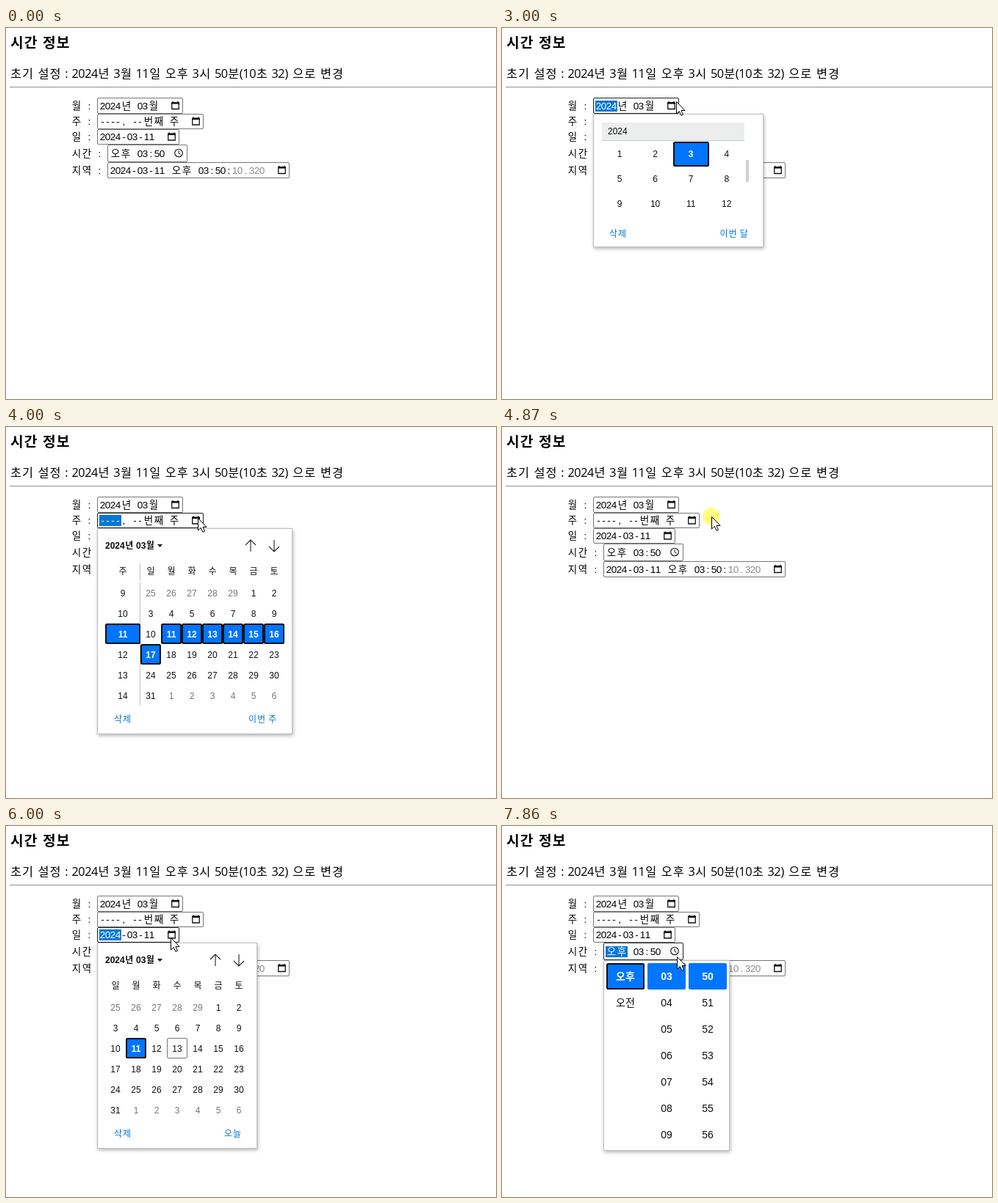
Animation, 667 px wide and 506 px high, one loop 8 s. Source, as an HTML page:

```html
<!DOCTYPE html>
<html lang="ko">
<head>
<meta charset="utf-8">
<style>
  html, body { margin: 0; width: 100%; height: 100%; overflow: hidden; background: #fff; }
  svg { display: block; width: 667px; height: 506px; }
  text { white-space: pre; text-anchor: middle; }
  .sans { font-family: "Open Sans", "Noto Sans CJK KR", "Noto Sans CJK", sans-serif; }
  .mono { font-family: "Liberation Sans", "Noto Sans CJK KR", "Noto Sans CJK", sans-serif; font-size: 13.5px; }
  .ui { font-family: "Liberation Sans", "Noto Sans CJK KR", "Noto Sans CJK", sans-serif; }
  .popup { filter: drop-shadow(1px 2px 2.5px rgba(0, 0, 0, .3)); }
</style>
</head>
<body>
<svg id="stage" viewBox="0 0 667 506" xmlns="http://www.w3.org/2000/svg"></svg>
<script>
const LOOP = 8000;
const BLUE = '#0075ff', LINK = '#0078d4', GREY = '#767676', PICK = '#0078d7';
const stage = document.getElementById('stage');

const isHangul = c => c >= '가' && c <= '힣';
const monoStep = c => isHangul(c) ? 14 : 7;
const bodyStep = em => c => em * (isHangul(c) ? 1 : c === ' ' ? .35 : c === ':' ? .22 : '()'.includes(c) ? .3 : .55);
const uiStep = em => c => em * (isHangul(c) ? 1 : c === ' ' ? .278 : .556);

const rect = (x, y, w, h, fill, extra = '') =>
  `<rect x="${x}" y="${y}" width="${w}" height="${h}" fill="${fill}" ${extra}/>`;
const path = (d, extra) => `<path d="${d}" ${extra}/>`;

// Each character is centred in its own advance.
function run(x, y, str, step, attrs) {
  const xs = [];
  for (const c of str) {
    xs.push(+(x + step(c) / 2).toFixed(2));
    x += step(c);
  }
  return `<text x="${xs.join(' ')}" y="${y}" ${attrs}>${str}</text>`;
}

const mono = (x, y, str, fill = '#000') => run(x, y, str, monoStep, `class="mono" fill="${fill}"`);
const ui = (x, y, str, fill, weight = 400, size = 12) =>
  run(x, y, str, uiStep(size), `class="ui" font-size="${size}" font-weight="${weight}" fill="${fill}"`);
const cell = (x, y, str, fill = '#101010', weight = 400, size = 12) =>
  `<text class="ui" x="${x}" y="${y}" font-size="${size}" font-weight="${weight}" fill="${fill}">${str}</text>`;

// Editable parts have one pixel of padding on both sides.
function parts(x, y, str, fill) {
  let out = '';
  for (const part of str.split('|')) {
    if (part.trim()) out += mono(x, y, part, fill);
    x += [...part].reduce((sum, c) => sum + monoStep(c), 1);
  }
  return out;
}

const selected = (x, y, w, h) =>
  rect(x + 1, y + 1, w - 2, h - 2, BLUE, 'rx="1.5" stroke="#101010" stroke-width="2"');

const calendarIcon = (x, y) =>
  path(`M${x - 4.75} ${y - 3.5}h9.5v8.5h-9.5z`, 'fill="none" stroke="#111" stroke-width="1.3"') +
  rect(x - 5.3, y - 4.5, 10.6, 2.6, '#111') +
  rect(x - 4, y - 5.6, 1.3, 2, '#111') + rect(x + 2.7, y - 5.6, 1.3, 2, '#111');

const clockIcon = (x, y) =>
  `<circle cx="${x}" cy="${y}" r="5.3" fill="none" stroke="#111" stroke-width="1.1"/>` +
  path(`M${x} ${y - 3.3}v3.6l2.7 1.6`, 'fill="none" stroke="#111"');

const fields = [
  { id: 'month', label: '월 :', x: 124, y: 95, w: 117, h: 22, base: 111, text: '2024|년 |03|월' },
  { id: 'week', label: '주 :', x: 124, y: 117, w: 145, h: 21, base: 132, text: '----|, |--|번째 주' },
  { id: 'date', label: '일 :', x: 124, y: 138, w: 112, h: 21, base: 153, text: '2024|-|03|-|11' },
  { id: 'time', label: '시간 :', x: 138, y: 159, w: 109, h: 24, base: 176, text: '오후| |03|:|50' },
  { id: 'local', label: '지역 :', x: 138, y: 183, w: 248, h: 22, base: 199, text: '2024|-|03|-|11| |오후| |03|:|50|:' }
];

function drawField(f) {
  const first = f.text.split('|')[0], mid = f.y + f.h / 2 - .5, right = f.x + f.w;
  return mono(89, f.base - .5, f.label) +
    rect(f.x + .5, f.y + .5, f.w - 1, f.h - 1, '#fff', `id="${f.id}-box" rx="1.5" stroke="${GREY}"`) +
    parts(f.x + 4, f.base, f.text) +
    (f.id === 'local' ? parts(308, f.base, '10|.|320', '#8a8a8a') : '') +
    (f.id === 'time' ? clockIcon(right - 12, mid) : calendarIcon(right - 10.5, mid)) +
    `<g id="${f.id}-pick">${rect(f.x + 3, f.base - 12, 30, 15, PICK)}${mono(f.x + 4, f.base, first, '#fff')}</g>`;
}

const popup = (id, x, y, w, h, body) =>
  `<g id="${id}-popup"><g class="popup">${rect(x + .5, y + .5, w - 1, h - 1, '#fff', 'stroke="#bfbfbf"')}</g>${body}</g>`;

function monthBody() {
  let out = rect(136, 129, 194, 25, '#eceeee') + rect(136, 153, 194, 1, '#c8c8c8') +
    ui(144, 145, '2024', '#101010') + rect(332, 180, 4, 30, '#d0d0d0') + selected(233, 155, 49, 34);
  for (let i = 0; i < 12; i++) {
    const on = i === 2;
    out += cell(160 + 48.6 * (i % 4), 176 + 34 * Math.floor(i / 4), i + 1, on ? '#fff' : '#101010', on ? 700 : 400);
  }
  return out + ui(145.5, 285, '삭제', LINK) + ui(296, 285, '이번 달', LINK);
}

// Day grid shared by the week and the date pickers.
function dayBody(top, left, right, byWeek) {
  const arrow = (x, s) => path(`M${x} ${top + 24 + 8 * s}v${-16 * s}m-7 ${7 * s}l7 ${-7 * s}l7 ${7 * s}`,
    'fill="none" stroke="#222" stroke-width="1.1"');
  let out = ui(135, top + 28, '2024년 03월', '#101010', 700) +
    path(`M206 ${top + 22}h7l-3.5 4z`, 'fill="#101010"') + arrow(right - 57, 1) + arrow(right - 25, -1);
  [...'일월화수목금토'].forEach((d, i) => out += cell(left + 28 * i, top + 63, d));
  if (byWeek) {
    out += cell(159, top + 63, '주') + rect(182, top + 48, 1, 24, '#bfbfbf') +
      rect(182, top + 74, 1, 168, '#bfbfbf') + selected(135, top + 130, 48, 28);
    for (let r = 0; r < 6; r++) out += cell(159, top + 93 + 28 * r, 9 + r, r === 2 ? '#fff' : '#101010', r === 2 ? 700 : 400);
  }
  for (let i = 0; i < 42; i++) {
    const n = i - 4, inside = n > 0 && n < 32;
    const on = n >= 11 && n <= (byWeek ? 17 : 11);
    const x = left + 28 * (i % 7), y = top + 93 + 28 * Math.floor(i / 7);
    if (on) out += selected(x - 14, y - 19, 28, 28);
    if (n === 13 && !byWeek) out += rect(x - 13.5, y - 18.5, 27, 27, 'none', `rx="1.5" stroke="${GREY}"`);
    out += cell(x, y, n < 1 ? n + 29 : n > 31 ? n - 31 : n, on ? '#fff' : inside ? '#101010' : GREY, on ? 700 : 400);
  }
  return out + ui(146.5, top + 265, '삭제', LINK) +
    (byWeek ? ui(329.5, top + 265, '이번 주', LINK) : ui(296.5, top + 265, '오늘', LINK));
}

function timeBody() {
  let out = selected(142, 187, 52, 36) + rect(198, 187, 52, 36, BLUE, 'rx="2"') + rect(254, 187, 52, 36, BLUE, 'rx="2"');
  const item = (x, row, s) => cell(x, 210 + 36 * row, s, row ? '#101010' : '#fff', row ? 400 : 700, 14);
  out += item(168, 0, '오후') + item(168, 1, '오전');
  for (let r = 0; r < 7; r++) out += item(224, r, '0' + (3 + r)) + item(280, r, 50 + r);
  return out;
}

stage.innerHTML =
  rect(0, 0, 667, 506, '#fff') +
  run(5.5, 27, '시간 정보', bodyStep(18.7), 'class="sans" font-size="19.2" font-weight="700"') +
  run(5.5, 68, '초기 설정 : 2024년 3월 11일 오후 3시 50분(10초 32) 으로 변경', bodyStep(16), 'class="sans" font-size="16.3"') +
  rect(5, 80, 662, 1, '#9a9a9a') + rect(5, 81, 662, 1, '#eee') +
  fields.map(drawField).join('') +
  popup('month', 124, 117, 232, 182, monthBody()) +
  popup('week', 124, 138, 266, 281, dayBody(138, 197, 390, true)) +
  popup('date', 124, 159, 218, 281, dayBody(159, 149, 342, false)) +
  popup('time', 138, 183, 172, 260, timeBody()) +
  '<circle id="click" r="12" fill="#ff0" opacity=".5"/>' +
  '<g id="cursor">' +
  path('M.5 .5V17L4.3 13.5L6.9 19.3L9.5 18.2L7 12.5H12.1Z', 'fill="#fff" stroke="#000" stroke-linejoin="round"') +
  '</g>';

const $ = id => document.getElementById(id);
const show = (id, on) => $(id).setAttribute('visibility', on ? 'visible' : 'hidden');
const within = (t, spans) => spans.some(([a, b]) => t >= a && t < b);

// time, x, y of the pointer
const moves = [
  [900, 26, 104], [1680, 220, 101], [1810, 220, 101], [1940, 237, 100], [3000, 237, 100],
  [3080, 251, 100], [3220, 256, 98], [3340, 256, 98], [3800, 261, 124], [4440, 261, 124],
  [4540, 285, 122], [5100, 285, 122], [5800, 224, 152], [6300, 224, 152], [6700, 257, 149],
  [7140, 257, 149], [7320, 238, 178], [LOOP, 238, 178]
];
const clicks = [[1940, 2200], [3220, 3340], [3800, 3960], [4870, 5000], [5800, 5990], [6760, 6920], [7660, 7860]];
const open = { month: [2080, 3220], week: [3880, 4870], date: [6000, 6760], time: [7740, LOOP] };
const picked = { month: [2000, 3220], week: [3820, 4870], date: [5860, 6760], time: [7660, LOOP] };

function pointer(t) {
  const i = Math.max(1, moves.findIndex(m => m[0] > t));
  const [a, x, y] = moves[i - 1], [b, u, v] = moves[i];
  const p = Math.min(1, Math.max(0, (t - a) / (b - a)));
  const e = p * p * (3 - 2 * p);
  return [x + (u - x) * e, y + (v - y) * e];
}

function draw(t) {
  const [x, y] = pointer(t);
  const at = `translate(${Math.round(x)} ${Math.round(y)})`;
  $('cursor').setAttribute('transform', at);
  $('click').setAttribute('transform', at);
  show('cursor', t >= 930);
  show('click', within(t, clicks));
  for (const f of fields) {
    const focus = within(t, [picked[f.id] || [0, 0]]);
    const hover = t >= 930 && x >= f.x && x < f.x + f.w && y >= f.y && y < f.y + f.h;
    $(f.id + '-box').setAttribute('stroke', focus ? '#222' : hover ? '#4f4f4f' : GREY);
    show(f.id + '-pick', focus);
    if (open[f.id]) show(f.id + '-popup', within(t, [open[f.id]]));
  }
}

const start = performance.now();
function tick() {
  draw((performance.now() - start) % LOOP);
  requestAnimationFrame(tick);
}
draw(0);
requestAnimationFrame(tick);
</script>
</body>
</html>
```
